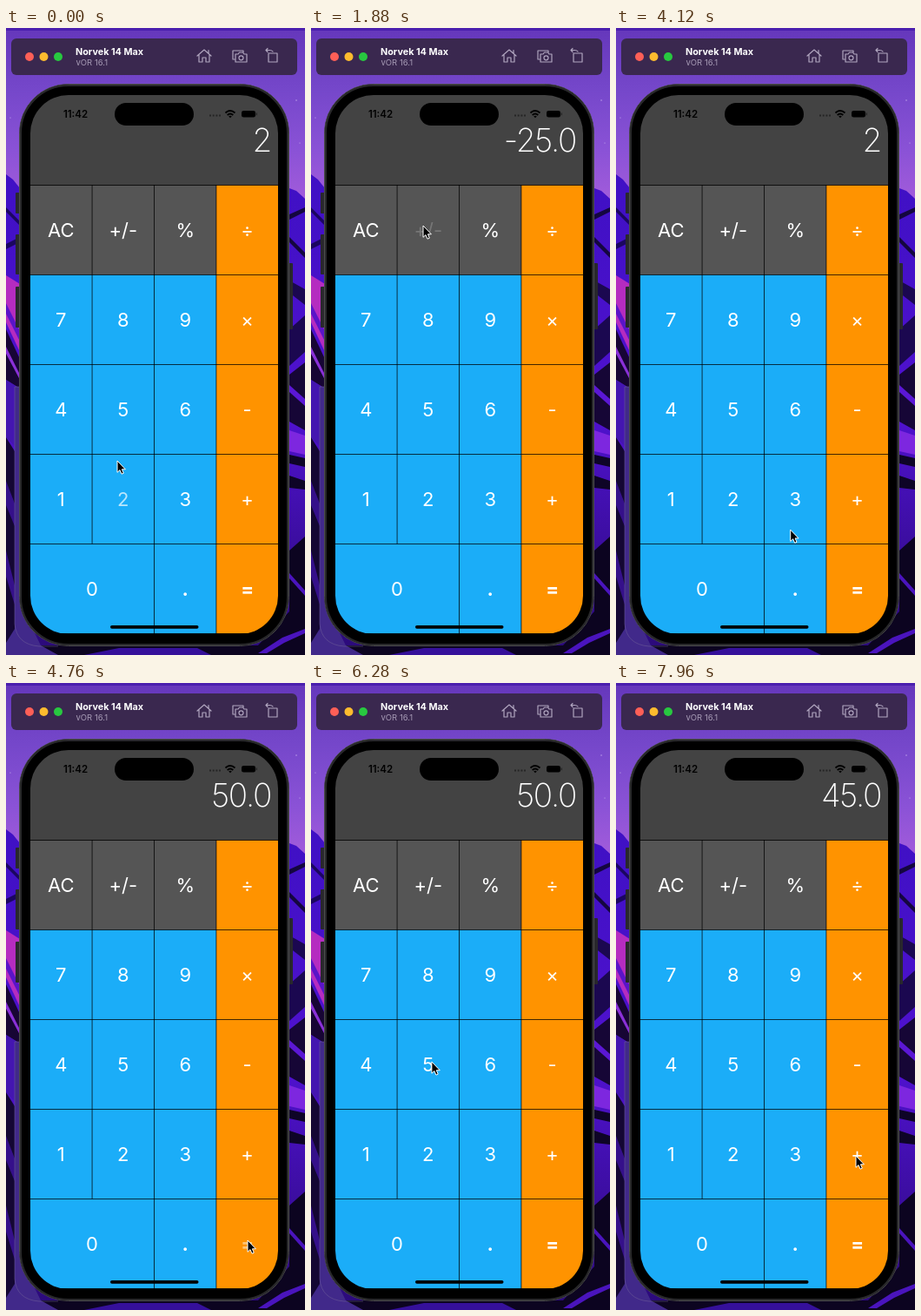
An HTML page that plays this animation: 344 by 720 pixels, repeating every 8 s.

```html
<!DOCTYPE html>
<html lang="en">
<head>
<meta charset="utf-8">
<title>Calculator</title>
<style>
  html, body { margin: 0; width: 100%; height: 100%; overflow: hidden; background: #000; }
  svg { display: block; width: 344px; height: 720px; font-family: Inter, Roboto, sans-serif; }
  #keys text { font-size: 22px; fill: #fff; text-anchor: middle; }
  #display { font-size: 37px; font-weight: 200; letter-spacing: -1.3px; fill: #fff; text-anchor: end; }
  .icon { fill: none; stroke: #b0a5bf; stroke-width: 1.2; stroke-linejoin: round; stroke-linecap: round; }
</style>
</head>
<body>
<svg viewBox="0 0 344 720">
  <defs>
    <linearGradient id="sky" x2="0" y2="1">
      <stop offset="0" stop-color="#6537bb"/>
      <stop offset=".35" stop-color="#7547ca"/>
      <stop offset=".7" stop-color="#8a52d6"/>
      <stop offset="1" stop-color="#a35cdb"/>
    </linearGradient>
    <linearGradient id="hill" x2="0" y2="1">
      <stop offset="0" stop-color="#3f10c4"/>
      <stop offset=".5" stop-color="#5012cf"/>
      <stop offset="1" stop-color="#2a0a78"/>
    </linearGradient>
    <clipPath id="screen"><rect x="28" y="77" width="285" height="619" rx="44"/></clipPath>
  </defs>

  <!-- wallpaper -->
  <rect width="344" height="200" fill="url(#sky)"/>
  <rect width="344" height="3" fill="#4a1fae"/>
  <g fill="#c9b0f0"><circle cx="334" cy="83" r=".7"/><circle cx="338" cy="132" r=".6"/><circle cx="5" cy="103" r=".6"/></g>
  <path d="M0 168L8 174 16 184H326L334 187 344 196V720H0Z" fill="url(#hill)"/>
  <path d="M0 206L16 222V227L0 211ZM0 248L16 240V246L0 254Z" fill="#1b0660"/>
  <path d="M0 284L16 294V372L0 338Z" fill="#b52cc0"/>
  <path d="M0 316L16 348V360L0 328Z" fill="#5a14c8"/>
  <path d="M0 346L16 380V414L0 404Z" fill="#170534"/>
  <path d="M0 366L16 398V404L0 374Z" fill="#8a30d8"/>
  <path d="M0 404L16 414V486L0 470Z" fill="#4416b0"/>
  <path d="M0 470L10 486V720H0Z" fill="#140733"/>
  <path d="M0 520L10 546V572L0 548ZM0 600L10 640V662L0 630Z" fill="#35108a"/>
  <path d="M10 412H16V660L40 709H60V720H0V706L10 690Z" fill="#41298a"/>
  <path d="M326 214L344 206V211L326 220ZM326 240L344 258V264L326 246Z" fill="#14063f"/>
  <path d="M326 290L344 300V318L326 304ZM326 346L344 330V372L326 388Z" fill="#1b0850"/>
  <path d="M326 398L344 384V462L326 452Z" fill="#160636"/>
  <path d="M326 410L344 426V434L326 418Z" fill="#5b17d4"/>
  <path d="M326 462L344 468V490L326 486Z" fill="#7d27df"/>
  <path d="M326 490L344 494V504L326 500ZM326 514L344 520V530L326 528Z" fill="#0e0426"/>
  <path d="M326 600L344 584V720H60L40 709H290L326 670Z" fill="#0c0420"/>
  <path d="M326 626L344 646V652L326 632ZM290 718L318 700 344 690V695L320 706 300 718Z" fill="#4a14bd"/>
  <path d="M90 720L130 712H220L236 720Z" fill="#35109a"/>
  <path d="M15 412H10V684Q12 708 38 710H60" fill="none" stroke="#75659a" stroke-opacity=".6" stroke-width=".8"/>

  <!-- window bar -->
  <rect x="6" y="12" width="329" height="42" rx="6" fill="#3a284f"/>
  <circle cx="27" cy="33" r="5" fill="#fe5f57"/>
  <circle cx="43.500" cy="33" r="5" fill="#febc2e"/>
  <circle cx="60" cy="33" r="5" fill="#28c840"/>
  <text x="80" y="31" font-size="10.8" font-weight="700" fill="#fff">Norvek 14 Max</text>
  <text x="80.500" y="43" font-size="9.5" fill="#a79bb6">vOR 16.1</text>
  <g class="icon">
    <path d="M220 32L228 25 236 32M222 31V39H226V34H230V39H234V31M233 29V25.500"/>
    <path d="M263 36H261V26H273V28M264 30H267L268.500 28H272.500L274 30H277V39H264Z"/>
    <circle cx="270.500" cy="34.300" r="2.500"/>
    <path d="M302 29H312V39H302ZM307 27Q306 25.500 303 25.500H299M301 23.500L299 25.500 301 27.500"/>
  </g>

  <!-- phone -->
  <g fill="#29282c">
    <rect x="11" y="189" width="6" height="24" rx="1"/>
    <rect x="11" y="237" width="6" height="46" rx="1"/>
    <rect x="11" y="297" width="6" height="47" rx="1"/>
    <rect x="324" y="270" width="6" height="76" rx="1"/>
  </g>
  <rect x="15.500" y="64.500" width="310" height="645" rx="56" fill="#000" stroke="#4d4d4e"/>
  <rect x="17" y="66" width="307" height="642" rx="54.500" fill="none" stroke="#29292b" stroke-width="2"/>
  <g clip-path="url(#screen)">
    <rect x="28" y="77" width="285" height="103" fill="#434343"/>
    <g id="keys"></g>
  </g>
  <rect x="125" y="86" width="91" height="26" rx="13"/>
  <text x="80" y="103" font-size="11.5" font-weight="600" text-anchor="middle">11:42</text>
  <path d="M234 100.500H247" stroke="#252525" stroke-width="1.8" stroke-dasharray="2 1.700"/>
  <path d="M252.500 97.500Q258 92.500 263.500 97.500M254.700 100Q258 97 261.300 100" fill="none" stroke="#000" stroke-width="1.8"/>
  <path d="M256.200 101.500Q258 100 259.800 101.500L258 103.300Z"/>
  <rect x="271" y="95" width="16" height="7.500" rx="2.300"/>
  <rect x="287.700" y="97.300" width="1.200" height="3" rx=".6" fill="#222"/>
  <rect x="120" y="686" width="101.500" height="3.700" rx="1.850"/>
  <text id="display" x="305" y="142"></text>
  <path id="cursor" d="M0 0V13.300L3 10.600 5 15.200 7.300 14.200 5.400 9.800H9.400Z" stroke="#fff" stroke-width="1" stroke-linejoin="round"/>
</svg>
<script>
const LOOP = 8000, FADE = 470, DIM = 0.15;
const LEFT = 28, TOP = 180.1, GAP = 0.73, CELL_WIDTH = 70.7, CELL_HEIGHT = 102.27;
const ROWS = [
  ['AC', '+/-', '%', '÷'],
  ['7', '8', '9', '×'],
  ['4', '5', '6', '-'],
  ['1', '2', '3', '+'],
  ['0', '', '.', '='],
];

// key, touch down, touch up, value shown from then on
const PRESSES = [
  ['2', -400, -300, '2'],
  ['5', 430, 520, '25'],
  ['+/-', 1770, 1855, '-25.0'],
  ['+/-', 2260, 2345, '25.0'],
  ['×', 3020, 3100, '25.0'],
  ['2', 3540, 3630, '2'],
  ['=', 4500, 4590, '50.0'],
  ['-', 5780, 5870, '50.0'],
  ['5', 6400, 6490, '5'],
  ['=', 7260, 7350, '45.0'],
];

// time and pointer tip; equal neighbours are rests
const PATH = [
  [0, 128, 497], [120, 128, 497], [400, 131, 438], [900, 131, 438],
  [1580, 129, 227], [2380, 129, 227], [2900, 286.5, 342.5], [3130, 286.5, 342.5],
  [3480, 136, 538], [3720, 136, 538], [4120, 200.5, 576], [4430, 278, 640],
  [4800, 278, 640], [5440, 293.5, 521], [5720, 281, 433], [5920, 281, 433],
  [6320, 135, 435], [6600, 135, 435], [7000, 248.5, 572], [7200, 278, 640],
  [7430, 278, 640], [7840, 276, 543], [8000, 276, 543],
];

const byId = id => document.getElementById(id);
const labels = {};

function add(parent, tag, attributes, text = '') {
  const node = document.createElementNS('http://www.w3.org/2000/svg', tag);
  for (const name in attributes) node.setAttribute(name, attributes[name]);
  node.textContent = text;
  return parent.appendChild(node);
}

function buildKeys() {
  const keys = byId('keys');
  ROWS.forEach((row, r) => row.forEach((label, c) => {
    if (!label) return;
    const x = LEFT + c * (CELL_WIDTH + GAP);
    const y = TOP + GAP + r * (CELL_HEIGHT + GAP);
    const width = label === '0' ? 2 * CELL_WIDTH + GAP : CELL_WIDTH;
    const fill = c === 3 ? '#ff9300' : r ? '#1badf8' : '#555';
    add(keys, 'rect', { x, y, width, height: CELL_HEIGHT, fill });
    labels[label] = add(keys, 'text', {
      x: x + width / 2, y: y + 59.2,
      'font-weight': label === '.' || label === '=' ? 700 : 400,
    }, label);
  }));
}

function slope(i, axis) {
  const before = PATH[i - 1], here = PATH[i], after = PATH[i + 1];
  if (!before || !after) return 0;
  const resting = p => p[1] === here[1] && p[2] === here[2];
  if (resting(before) || resting(after)) return 0;
  return (after[axis] - before[axis]) / (after[0] - before[0]);
}

function pointerAt(t, axis) {
  const i = PATH.findIndex(p => p[0] > t) - 1;
  const a = PATH[i], b = PATH[i + 1], span = b[0] - a[0];
  const u = (t - a[0]) / span, ease = u * u * (3 - 2 * u);
  return a[axis] + (b[axis] - a[axis]) * ease
    + span * u * (1 - u) * ((1 - u) * slope(i, axis) - u * slope(i + 1, axis));
}

function keyOpacity(label, t) {
  const press = PRESSES.filter(p => p[0] === label && p[1] <= t).pop();
  if (!press) return 1;
  const [, down, up] = press;
  if (t < up) return Math.max(DIM, 1 - (t - down) / 50);
  return Math.min(1, DIM + (1 - DIM) * (t - up) / FADE);
}

function draw(t) {
  byId('display').textContent = PRESSES.filter(p => p[2] <= t).pop()[3];
  for (const label in labels) labels[label].setAttribute('opacity', keyOpacity(label, t));
  byId('cursor').setAttribute('transform', `translate(${pointerAt(t, 1)} ${pointerAt(t, 2)})`);
}

buildKeys();
const start = performance.now();
function tick() {
  draw((performance.now() - start) % LOOP);
  requestAnimationFrame(tick);
}
tick();
</script>
</body>
</html>
```
